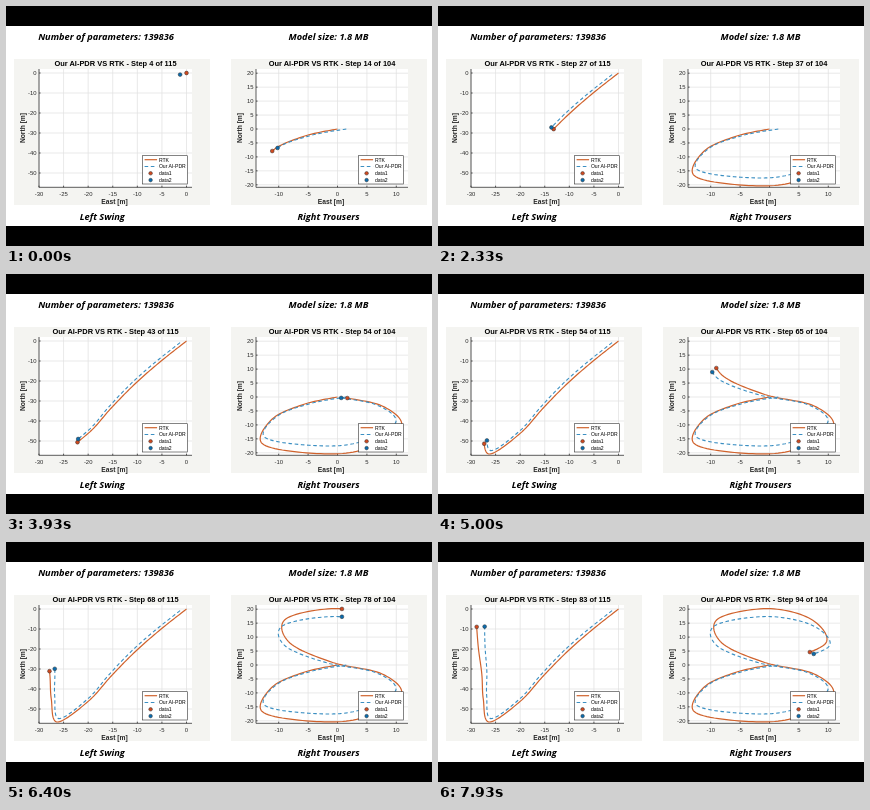
Recreate the animation shown at these times as an HTML page. Size 426x240 px, loop 8000 ms.

```html
<!DOCTYPE html>
<html lang="en">
<head>
<meta charset="utf-8">
<title>Pedestrian tracks</title>
<style>
html, body { margin: 0; width: 100%; height: 100%; overflow: hidden; background: #000; }
svg { display: block; width: 100vw; height: 100vh; }
text { font-family: "Liberation Sans", Arial, sans-serif; fill: #262626; }
.head { font: italic 700 9.25px "Open Sans", "Noto Sans", sans-serif; fill: #000; text-anchor: middle; }
.title { font-size: 7.45px; font-weight: 700; fill: #000; text-anchor: middle; }
.axis { font-size: 6.7px; font-weight: 700; text-anchor: middle; }
.tick { font-size: 5.9px; }
.key { font-size: 5.1px; fill: #000; }
.rtk { fill: none; stroke: #d0622c; stroke-width: 1.2; stroke-linejoin: round; }
.pdr { fill: none; stroke: #3b8fc2; stroke-width: 1.1; stroke-dasharray: 3.6 2.6; }
.dot { stroke: #333; stroke-width: .5; }
</style>
</head>
<body>
<svg id="stage" viewBox="0 0 426 240"></svg>
<script>
const LOOP = 8000;
const RED = '#d04a20', BLUE = '#0b6cae';
const { sin, cos, exp, floor, min, max, PI } = Math;
const stage = document.getElementById('stage');

function add(parent, tag, attrs, text) {
  const el = document.createElementNS('http://www.w3.org/2000/svg', tag);
  for (const k in attrs) el.setAttribute(k, attrs[k]);
  if (text !== undefined) el.textContent = text;
  parent.appendChild(el);
  return el;
}

const range = (from, to, by) =>
  Array.from({ length: floor((to - from) / by + 1e-6) + 1 }, (_, i) => from + i * by);

// A walk is a curve through key points in metres, one every `stride` steps.
// `drift` turns a true position into the estimated one.
const plots = [
  {
    x: 33, w: 153, total: 115, name: 'Left Swing', nameX: 96.3,
    xs: range(-30, 0, 5), ys: range(-50, 0, 10),
    px: v => 180.5 + v * 4.917, py: v => 67 - v * 2,
    first: 4, stride: 9,
    walk: [[0, 0], [-5.4, -10.5], [-10.5, -21.5], [-15.3, -33.5], [-20, -46.2],
      [-26.3, -56.5], [-27.5, -45], [-27.8, -32.5], [-28.5, -19.5], [-28.9, -7]],
    drift: ([x, y], s) => [x - 1.45 + .037 * s, y + 1.7 * sin(PI * (s - 15) / 70)],
    step: t => 4 + t / 100
  },
  {
    x: 250, w: 152, total: 104, name: 'Right Trousers', nameX: 322.5,
    xs: range(-10, 10, 5), ys: range(-20, 20, 5),
    px: v => 331.5 + v * 5.88, py: v => 123 - v * 2.79,
    first: 0, stride: 7,
    walk: [[0, 0], [-5.7, -2.6], [-11.1, -7.9], [-12.8, -16.7], [-4.7, -20.1],
      [3.8, -19.2], [10.8, -10.8], [7.6, -3.2], [-.8, .9], [-8.1, 7.9],
      [-8.8, 16.5], [-.4, 20.2], [7, 16.5], [9.6, 7.9], [2.5, 1.4]],
    drift: ([x, y], s) => [x + 1.5 * cos(PI * s / 52) * exp(-s / 150), y * .86],
    step: t => 14.1 + .0101 * t + .25 * (1 - cos(2 * PI * t / LOOP))
  }
];

// Catmull-Rom position on the walk at a step.
function truth({ walk, first, stride }, s) {
  const last = walk.length - 1, pos = (s - first) / stride;
  const i = max(0, min(floor(pos), last - 1)), u = pos - i, v = 1 - u;
  const a = walk[i], b = walk[i + 1];
  const before = walk[max(i - 1, 0)], after = walk[min(i + 2, last)];
  return [0, 1].map(k =>
    a[k] * (1 + 2 * u) * v * v + (b[k] - before[k]) / 2 * u * v * v
    + b[k] * u * u * (3 - 2 * u) - (after[k] - a[k]) / 2 * u * u * v);
}

function drawLegend(x) {
  add(stage, 'rect', { x, y: 149.7, width: 45, height: 28.3, fill: '#fff', stroke: '#333', 'stroke-width': .6 });
  ['RTK', 'Our AI-PDR', 'data1', 'data2'].forEach((label, i) => {
    const y = 153.7 + i * 6.8;
    if (i < 2) add(stage, 'path', { class: i ? 'pdr' : 'rtk', d: `M${x + 2} ${y}h12.5` });
    else add(stage, 'circle', { class: 'dot', cx: x + 8, cy: y, r: 1.8, fill: i === 2 ? RED : BLUE });
    add(stage, 'text', { class: 'key', x: x + 16.3, y: y + 1.8 }, label);
  });
}

function build(p) {
  const mid = p.x + p.w / 2;
  add(stage, 'rect', { x: p.x - 25, y: 53, width: 196, height: 146, fill: '#f4f4f1' });
  add(stage, 'rect', { x: p.x, y: 63, width: p.w, height: 118.3, fill: '#fff' });
  let grid = '', ticks = `M${p.x} 63V181.3H${p.x + p.w}`;
  for (const v of p.xs) {
    const x = p.px(v);
    grid += `M${x} 63V181.3`;
    ticks += `M${x} 181.3v-1.6`;
    add(stage, 'text', { class: 'tick', x, y: 189.6, 'text-anchor': 'middle' }, v);
  }
  for (const v of p.ys) {
    const y = p.py(v);
    grid += `M${p.x} ${y}h${p.w}`;
    ticks += `M${p.x} ${y}h1.6`;
    add(stage, 'text', { class: 'tick', x: p.x - 2.5, y: y + 2.1, 'text-anchor': 'end' }, v);
  }
  add(stage, 'path', { d: grid, stroke: '#e0e0e0', 'stroke-width': .7 });
  add(stage, 'path', { d: ticks, fill: 'none', stroke: '#333', 'stroke-width': .8 });
  add(stage, 'text', { class: 'axis', x: mid - 1, y: 197.6 }, 'East [m]');
  add(stage, 'text', { class: 'axis', transform: `translate(${p.x - 13.6} 122) rotate(-90)` }, 'North [m]');
  add(stage, 'text', { class: 'head', x: p.nameX, y: 214 }, p.name);
  p.title = add(stage, 'text', { class: 'title', x: mid, y: 60.3 }, '');
  p.tracks = [
    { at: s => truth(p, s), kind: 'rtk', fill: RED },
    { at: s => p.drift(truth(p, s), s), kind: 'pdr', fill: BLUE }
  ];
  for (const track of p.tracks) track.line = add(stage, 'path', { class: track.kind });
  for (const track of p.tracks) track.dot = add(stage, 'circle', { class: 'dot', r: 1.9, fill: track.fill });
  drawLegend(p.x + p.w - 49.4);
}

function render(t) {
  for (const p of plots) {
    const step = floor(p.step(t));
    p.title.textContent = `Our AI-PDR VS RTK - Step ${step} of ${p.total}`;
    for (const { at, line, dot } of p.tracks) {
      const points = range(p.first, step, .5).map(s => {
        const [x, y] = at(s);
        return [p.px(x).toFixed(2), p.py(y).toFixed(2)];
      });
      line.setAttribute('d', 'M' + points.join('L'));
      const [x, y] = points[points.length - 1];
      dot.setAttribute('cx', x);
      dot.setAttribute('cy', y);
    }
  }
}

add(stage, 'rect', { width: 426, height: 240, fill: '#000' });
add(stage, 'rect', { y: 20, width: 426, height: 200, fill: '#fff' });
add(stage, 'text', { class: 'head', x: 100, y: 34 }, 'Number of parameters: 139836');
add(stage, 'text', { class: 'head', x: 322.5, y: 34 }, 'Model size: 1.8 MB');
plots.forEach(build);

const start = performance.now();
function tick() {
  render((performance.now() - start) % LOOP);
  requestAnimationFrame(tick);
}
render(0);
requestAnimationFrame(tick);
</script>
</body>
</html>
```
